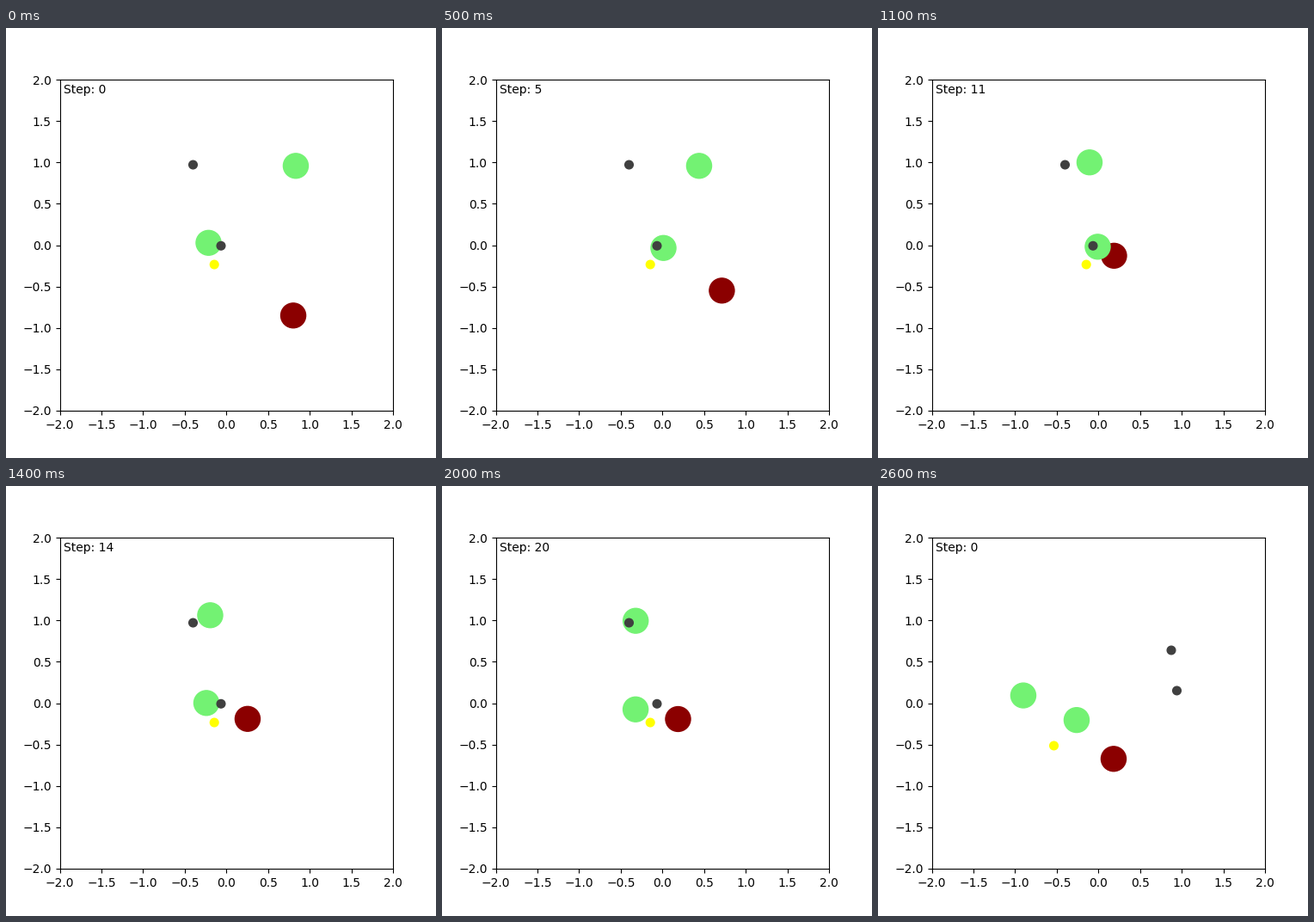
A matplotlib script that plays this animation: 500 px wide and 500 px high, repeating every 2700 ms.

```python
import matplotlib.pyplot as plt
from matplotlib.animation import FuncAnimation
from matplotlib.patches import Circle

EPISODE = 26  # steps 0..25, then the world resets for one step
GREEN = (0.45, 0.95, 0.45)
DARK = (0.25, 0.25, 0.25)

# Waypoints in world units: {step: x + y*i}
CHASER = {0: 0.803-0.850j, 5: 0.714-0.549j, 11: 0.188-0.128j,
          14: 0.255-0.190j, 16: 0.343-0.293j, 18: 0.292-0.257j,
          23: -0.013-0.070j}
LOWER = {0: -0.214+0.028j, 5: 0.013-0.034j, 11: -0.008-0.019j,
         14: -0.240+0.002j, 18: -0.374-0.029j, 23: -0.168-0.164j}
UPPER = {0: 0.833+0.958j, 5: 0.441+0.958j, 11: -0.106+1.000j,
         14: -0.194+1.062j, 18: -0.312+0.989j, 23: -0.302+1.031j}
LANDMARKS = [-0.400+0.971j, -0.0645-0.008j, -0.145-0.234j]
NEXT_WORLD = [0.183-0.673j, -0.261-0.204j, -0.901+0.093j,
              0.875+0.639j, 0.942+0.151j, -0.534-0.514j]


def velocities(t, p):
    """Start at rest, then blend the slopes on both sides of a waypoint."""
    h = [b - a for a, b in zip(t, t[1:])]
    slope = [(b - a) / d for a, b, d in zip(p, p[1:], h)]
    inner = [(slope[i] * h[i + 1] + slope[i + 1] * h[i]) / (h[i] + h[i + 1])
             for i in range(len(h) - 1)]
    return [0, *inner, slope[-1]]


def follow(path, step):
    """Cubic Hermite motion through the waypoints, holding the last one."""
    t, p = list(path), list(path.values())
    v = velocities(t, p)
    step = min(step, t[-1])
    i = max(k for k in range(len(t) - 1) if t[k] <= step)
    d = t[i + 1] - t[i]
    u = (step - t[i]) / d
    w = 1 - u
    return (w * w * ((1 + 2 * u) * p[i] + u * d * v[i])
            + u * u * ((3 - 2 * u) * p[i + 1] - w * d * v[i + 1]))


fig, ax = plt.subplots(figsize=(5, 5), dpi=100)
ax.set_xlim(-2, 2)
ax.set_ylim(-2, 2)
label = ax.text(-1.95, 1.95, "", va="top")


def add_circle(radius, color):
    return ax.add_patch(Circle((0, 0), radius, color=color))


circles = [add_circle(0.15, c) for c in ("darkred", GREEN, GREEN)]
circles += [add_circle(0.05, c) for c in (DARK, DARK, "yellow")]


def update(frame):
    step = frame % EPISODE
    if frame < EPISODE:
        spots = [follow(path, step) for path in (CHASER, LOWER, UPPER)]
        spots += LANDMARKS
    else:
        spots = NEXT_WORLD
    for circle, spot in zip(circles, spots):
        circle.center = spot.real, spot.imag
    label.set_text(f"Step: {step}")
    return [*circles, label]


anim = FuncAnimation(fig, update, frames=EPISODE + 1, interval=100, repeat=True)
plt.show()
```
